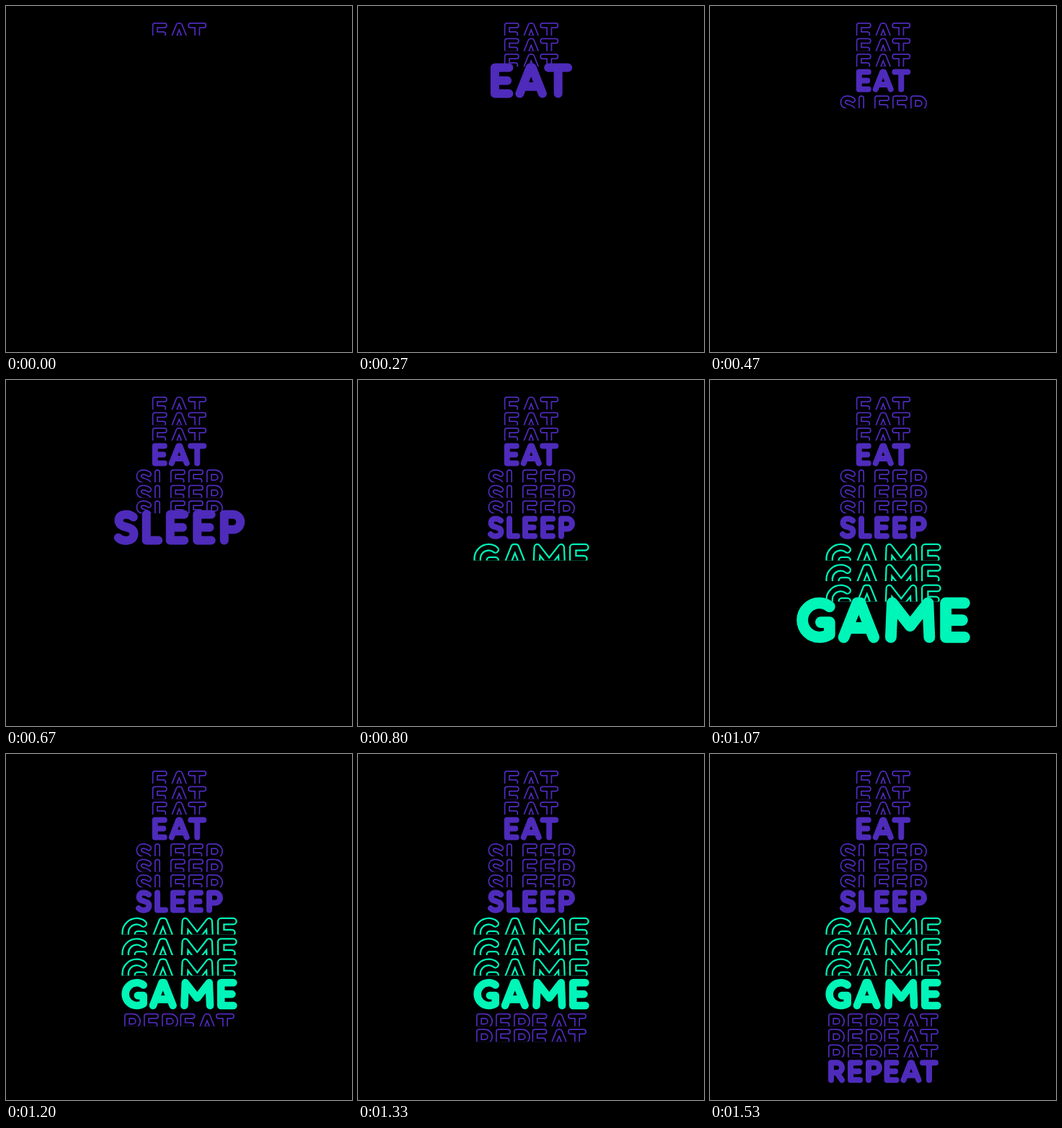
Write an HTML page with a canvas that moves like this. It is 480x480 px and loops after 1740 ms.

```html
<!DOCTYPE html>
<html lang="en">
<head>
<meta charset="utf-8">
<title>Eat Sleep Game Repeat</title>
<style>
html, body { margin: 0; width: 100%; height: 100%; overflow: hidden; background: #000; }
canvas { display: block; }
</style>
</head>
<body>
<canvas id="stage" width="480" height="480" role="img" aria-label="EAT SLEEP GAME REPEAT">EAT SLEEP GAME REPEAT</canvas>
<script>
const ctx = document.getElementById('stage').getContext('2d');
const LOOP = 1740, WORD_TIME = 400;
const CAP = 32, PITCH = 21.5, CUT = 18, WEIGHT = 8;
const PURPLE = '#4e2bbb', GREEN = '#00f5b8';

// Centre lines of rounded letters, cap height 32
const GLYPHS = {
  E: 'M17 4H4V28H17M4 16H15.5',
  A: 'M4 28L13.5 4H15.5L25 28M8.5 21.5H20.5',
  T: 'M4 4H22M13 4V28',
  S: 'M18 6.5C14 3 4.5 2.5 4.5 9.5C4.5 18 18.5 13.5 18.5 22C18.5 29.5 8 29.5 4 25.5',
  L: 'M4 4V28H15',
  P: 'M4 28V4H12A7 7 0 0 1 12 18H4',
  R: 'M4 28V4H12A7 7 0 0 1 12 18H4M12 18L19 28',
  G: 'M23 6.5C21 4.8 18.5 4 16 4A12 12 0 0 0 16 28C18.5 28 21 27.3 23 26V17.5H17',
  M: 'M4 28L5 4L17.5 20L30 4L31 28'
};

function makeWord(text, offsets, width, top, scale, color) {
  const path = new Path2D();
  offsets.forEach((x, i) => path.addPath(new Path2D(GLYPHS[text[i]]), { e: x - width / 2 }));
  return { path, width, top, scale, color };
}

const words = [
  makeWord('EAT', [0, 23, 49.5], 75.5, 87.5, 1, PURPLE),
  makeWord('SLEEP', [0, 26, 48, 73, 98], 121, 188.5, 1, PURPLE),
  makeWord('GAME', [0, 29, 62, 100.5], 121.5, 312, 1.32, GREEN),
  makeWord('REPEAT', [0, 27, 52, 77.5, 100.5, 127], 153, 424.3, 1, PURPLE)
];

function strokeWord(word, color, weight) {
  ctx.strokeStyle = color;
  ctx.lineWidth = weight;
  ctx.stroke(word.path);
}

function drawOutline(word, row) {
  ctx.save();
  ctx.translate(240.5, word.top - (3 - row) * PITCH * word.scale);
  ctx.scale(word.scale, word.scale);
  ctx.beginPath();
  ctx.rect(-word.width / 2 - 2, -2, word.width + 4, CUT + 2);
  ctx.clip();
  strokeWord(word, word.color, WEIGHT);
  strokeWord(word, '#000', WEIGHT - 3.4);
  ctx.restore();
}

function drawSolid(word, zoom) {
  const scale = word.scale * zoom;
  ctx.save();
  ctx.translate(240.5, word.top + CAP * word.scale / 2);
  ctx.scale(scale, scale);
  ctx.translate(0, -CAP / 2);
  strokeWord(word, word.color, WEIGHT);
  ctx.restore();
}

// Each word: three outlines in turn, then an oversized solid that snaps to size
function drawWord(word, t) {
  [0, 130, 200].forEach((start, row) => { if (t >= start) drawOutline(word, row); });
  if (t >= 270) drawSolid(word, t < 330 ? 1.5 : 1);
}

function frame() {
  const t = performance.now() % LOOP;
  ctx.fillStyle = '#000';
  ctx.fillRect(0, 0, 480, 480);
  ctx.lineCap = ctx.lineJoin = 'round';
  words.forEach((word, i) => drawWord(word, t - i * WORD_TIME));
  requestAnimationFrame(frame);
}
frame();
</script>
</body>
</html>
```
